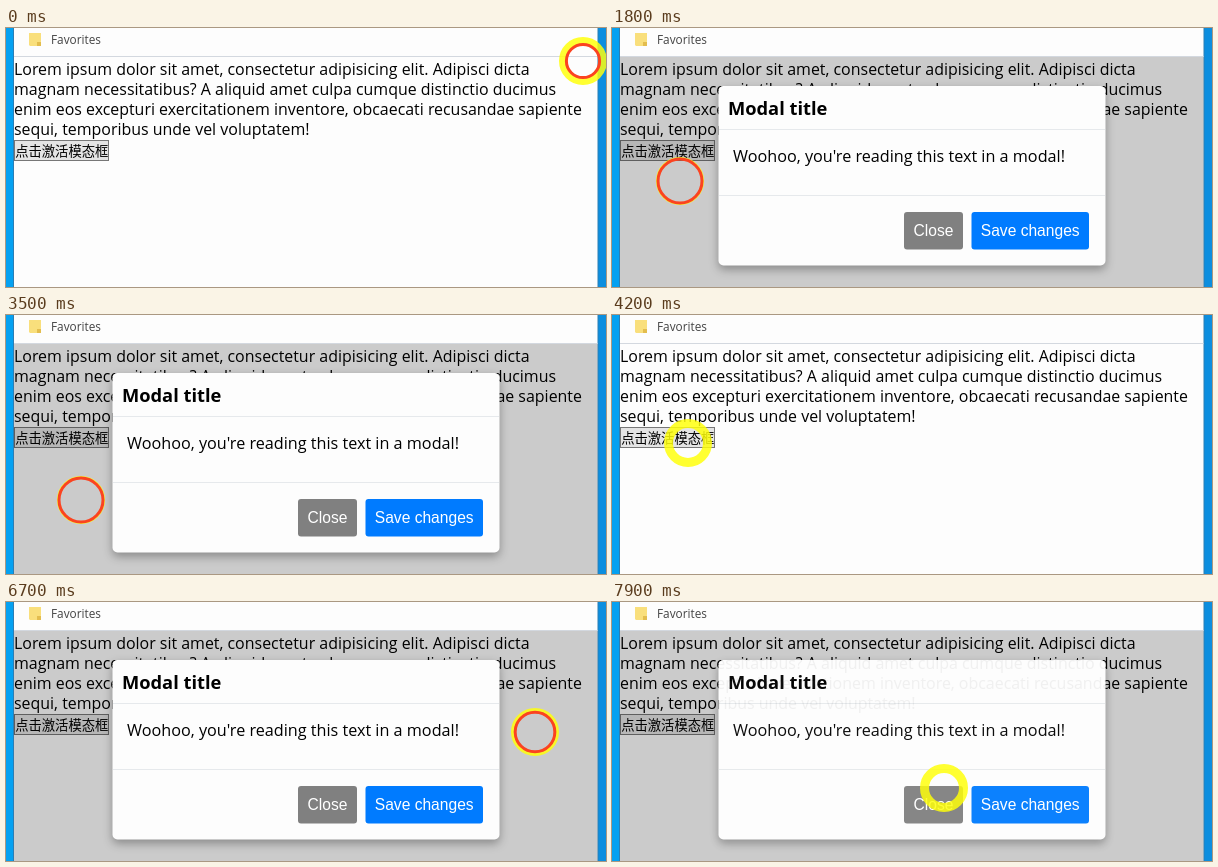
Recreate the animation shown at these times as an HTML page. Size 600x259 px, loop 8000 ms.

```html
<!DOCTYPE html>
<html lang="en">
<head>
<meta charset="utf-8">
<title>Modal demo</title>
<style>
  html, body { margin: 0; width: 100%; height: 100%; overflow: hidden; background: #fdfdfd; }
  svg { display: block; width: 600px; height: 259px; }
  text { font: 15.95px "Open Sans", "Noto Sans", sans-serif; fill: #000; white-space: pre; }
  .tab { font-size: 11.8px; fill: #444; }
  .cjk { font: 13.33px "Noto Sans CJK SC", "Noto Sans CJK", sans-serif; text-anchor: middle; }
  .title { font-size: 18.3px; font-weight: 700; }
  .body { font-size: 16.2px; }
  .btn { font: 15.6px "Liberation Sans", Arial, sans-serif; fill: #fff; text-anchor: middle; }
  .sheet { filter: drop-shadow(0 4px 5px rgba(0, 0, 0, .32)); }
</style>
</head>
<body>
<svg viewBox="0 0 600 259">
  <defs>
    <clipPath id="view"><rect x="8" y="29" width="584" height="230"/></clipPath>
  </defs>

  <!-- desktop and browser window -->
  <rect width="600" height="259" fill="#05a1f1"/>
  <rect x="592" width="8" height="259" fill="#0c8edf"/>
  <rect x="7" width="585.5" height="259" fill="#2b7eb5"/>
  <rect x="8" width="583.5" height="259" fill="#fdfdfd"/>
  <rect x="8" y="28" width="583.5" height="1" fill="#d3d8df"/>
  <path d="M23 5h12v8l-1 5H24l-1-1z" fill="#f9df7c"/>
  <path d="M31 18v-4h4v4z" fill="#e3bd4e"/>
  <text class="tab" x="45" y="16">Favorites</text>

  <!-- page -->
  <g clip-path="url(#view)">
    <text x="8" y="46.5">Lorem ipsum dolor sit amet, consectetur adipisicing elit. Adipisci dicta</text>
    <text x="8" y="66.7">magnam necessitatibus? A aliquid amet culpa cumque distinctio ducimus</text>
    <text x="8" y="86.9">enim eos excepturi exercitationem inventore, obcaecati recusandae sapiente</text>
    <text x="8" y="107.1">sequi, temporibus unde vel voluptatem!</text>
    <rect x="8.5" y="112.5" width="94" height="20" fill="#e4e4e4" stroke="#777"/>
    <text class="cjk" x="55.8" y="128">点击激活模态框</text>

    <!-- backdrop and dialog fade as one layer -->
    <g id="layer" opacity="0">
      <rect id="shade" x="8" y="29" width="583.5" height="230"/>
      <g id="dialog">
        <rect class="sheet" x="106.5" y="58" width="387" height="179.5" rx="5" fill="#fdfdfd"/>
        <path d="M107 101.5h386M107 167.5h386" stroke="#e6e9ec"/>
        <text class="title" x="116" y="87">Modal title</text>
        <text class="body" x="121" y="133.7">Woohoo, you're reading this text in a modal!</text>
        <rect x="292" y="184" width="59" height="37.5" rx="3" fill="#808080"/>
        <text class="btn" x="321.5" y="208">Close</text>
        <rect x="359.5" y="184" width="117.5" height="37.5" rx="3" fill="#007bff"/>
        <text class="btn" x="418.2" y="208">Save changes</text>
      </g>
    </g>
  </g>

  <!-- pointer highlight -->
  <g id="pointer" fill="none">
    <circle id="halo" stroke="#ffff0a" stroke-opacity=".84"/>
    <circle id="pulse" stroke="#fb4320" stroke-width="3"/>
  </g>
</svg>
<script>
  const LOOP = 8000, TICK = 100;
  const GLIDE = 300, REST = 200;               // pointer travel, then a pause before the click
  const PRESS = 400, DELAY = 60, FADE = 400;   // click ring, then the modal's reaction
  const OUTER = 24, INNER = 15;

  // the pointer visits these places and clicks there
  const click = (at, x, y) => ({ at, x, y });
  const clicks = [
    click(-150, 577, 33),
    click(665, 67, 122),
    click(1800, 68, 153),
    click(2500, 75, 122),
    click(3500, 75, 185),
    click(4400, 76, 128),
    click(5350, 267, 132),
    click(6000, 370, 133),
    click(6640, 529, 130),
    click(7460, 75, 124),
    click(8100, 332, 186)
  ];

  const $ = id => document.getElementById(id);
  const set = (el, attrs) => {
    for (const k in attrs) el.setAttribute(k, attrs[k]);
  };
  const clamp = v => Math.min(1, Math.max(0, v));
  const smooth = v => v * v * (3 - 2 * v);
  const [layer, shade, dialog, pointer, halo, pulse] =
    ["layer", "shade", "dialog", "pointer", "halo", "pulse"].map($);

  function pointerAt(t) {
    let { x, y } = clicks[0];
    for (const c of clicks.slice(1)) {
      const k = smooth(clamp((t - c.at + REST + GLIDE) / GLIDE));
      x += (c.x - x) * k;
      y += (c.y - y) * k;
    }
    return [x, y];
  }

  const onButton = c => c.x < 103 && c.y > 112 && c.y < 133;
  const inDialog = c => c.x > 106 && c.x < 494 && c.y > 58 && c.y < 238;

  // the button opens the modal, a click outside closes it; 0 is closed, 1 is open
  function opennessAt(t) {
    let open = 0, p = 0;
    for (const c of clicks) {
      const next = onButton(c) ? 1 : inDialog(c) ? open : 0;
      p += (next - open) * clamp((t - c.at - DELAY) / FADE);
      open = next;
    }
    return p;
  }

  function draw(t) {
    const p = opennessAt(t);
    set(layer, { opacity: p });
    set(shade, { opacity: 0.2 * p * (3 - 2 * p) });
    set(dialog, { transform: `translate(0 ${-44 * (1 - p) ** 3})` });

    const [x, y] = pointerAt(t);
    const press = clicks.find(c => t >= c.at && t < c.at + PRESS);
    const r = press ? 22 - 0.036 * (t - press.at) : INNER;
    set(pointer, { transform: `translate(${x} ${y})` });
    set(halo, { r: (r + OUTER) / 2, "stroke-width": OUTER - r });
    set(pulse, { r, opacity: press ? 1 : 0 });
  }

  function loop() {
    const t = performance.now() % LOOP;
    draw(Math.floor(t / TICK) * TICK);
    requestAnimationFrame(loop);
  }
  loop();
</script>
</body>
</html>
```
